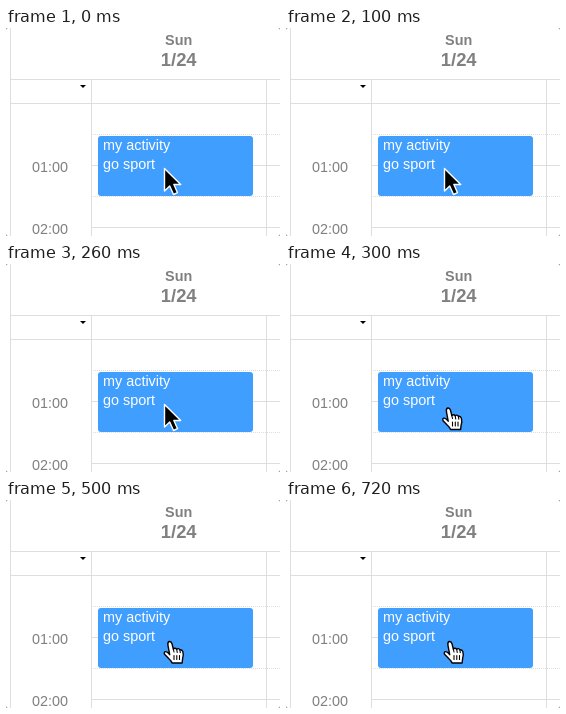
These frames come from a looping animation (274x208 px, 0.8 s). An HTML page:

```html
<!DOCTYPE html>
<html lang="en">
<head>
<meta charset="utf-8">
<title>Calendar event</title>
<style>
  html, body { margin: 0; width: 100%; height: 100%; overflow: hidden; background: #fff; }
  svg { display: block; width: 100vw; height: 100vh; }
  text { font: 14.4px "Liberation Sans", Arial, sans-serif; }
  .grid { fill: none; stroke: #dedede; }
  .dotted { stroke-dasharray: 1 1; }
  .label { fill: #808080; }
  .head { font-weight: bold; text-anchor: middle; }
  .date { font-size: 18.4px; }
  .event text { fill: #fff; }
</style>
</head>
<body>
<svg viewBox="0 0 274 208">
  <rect width="274" height="208" fill="#fff"/>
  <path class="grid" d="M4.5 0V208M85.5 51V208M260.5 51V208M4 51.5H274M4 75.5H274M85 137.5H274M85 199.5H274"/>
  <path class="grid dotted" d="M85 106.5H274M85 168.5H274"/>
  <path d="M0 0H2Q0 0 0 2ZM0 208V206Q0 208 2 208ZM274 0V2Q274 0 272 0ZM274 208H272Q274 208 274 206Z" fill="#777"/>

  <text class="label head" x="172.7" y="17">Sun</text>
  <text class="label head date" x="172.7" y="38">1/24</text>
  <text class="label" x="26" y="144">01:00</text>
  <text class="label" x="26" y="206">02:00</text>
  <path d="M74 57H80L77 60Z" fill="#000"/>

  <g class="event">
    <rect x="92" y="108" width="155" height="60" rx="3" fill="#409eff"/>
    <text x="97" y="122">my activity</text>
    <text x="97" y="141">go sport</text>
  </g>

  <g id="ring" fill="none">
    <circle cx="159" cy="137" r="42.5" stroke="#fff" stroke-width="4.4"/>
    <circle cx="159" cy="137" r="42.5" stroke="#000" stroke-width="2.6"/>
  </g>

  <path id="arrow" d="M0 0V22.5L5.2 17.5L9 26L13 24.2L9.4 16H16.2Z"
    fill="#000" stroke="#fff" stroke-width="1.4" stroke-linejoin="round"/>

  <g id="hand" stroke="#000" stroke-linecap="round" stroke-linejoin="round">
    <path fill="#fff" stroke-width="1.4" d="M6.2 14.2L4.5 5.2Q3.8 1.5 5.8 1Q7.8.7 8.6 3.5L9.8 8.5
      Q11.6 6.8 13.2 8.7Q15 7.3 16.4 9.4Q18.7 8.8 19.4 11.4Q20.4 15 19.1 18.3L18.6 22.5H8.6
      Q7.9 20.5 5.4 18.2L1.3 14Q0 12 1.7 11.2Q3.5 10.6 6.2 14.2Z"/>
    <path fill="none" stroke-width="1.1" d="M9.8 8.5L10.5 11.5M13.2 8.7L13.7 12M16.4 9.4L16.8 12.2M10.5 15V19M13.3 15V19M16 15V19"/>
  </g>
</svg>
<script>
  const LOOP = 800;
  const [ring, arrow, hand] = ["ring", "arrow", "hand"].map(id => document.getElementById(id));

  const show = (node, visible) => node.setAttribute("visibility", visible ? "visible" : "hidden");
  const place = (node, x, y) => node.setAttribute("transform", `translate(${x} ${y})`);

  function render(time) {
    const t = time % LOOP;
    const hovering = t >= 300;
    show(arrow, !hovering);
    show(hand, hovering);
    show(ring, t >= 400 && t < 500);
    place(arrow, 158.5, 140.5);
    if (t < 400) place(hand, 156, 143);
    else place(hand, 157.5, 140.5);
  }

  const start = performance.now();
  function tick() {
    render(performance.now() - start);
    requestAnimationFrame(tick);
  }
  tick();
</script>
</body>
</html>
```
